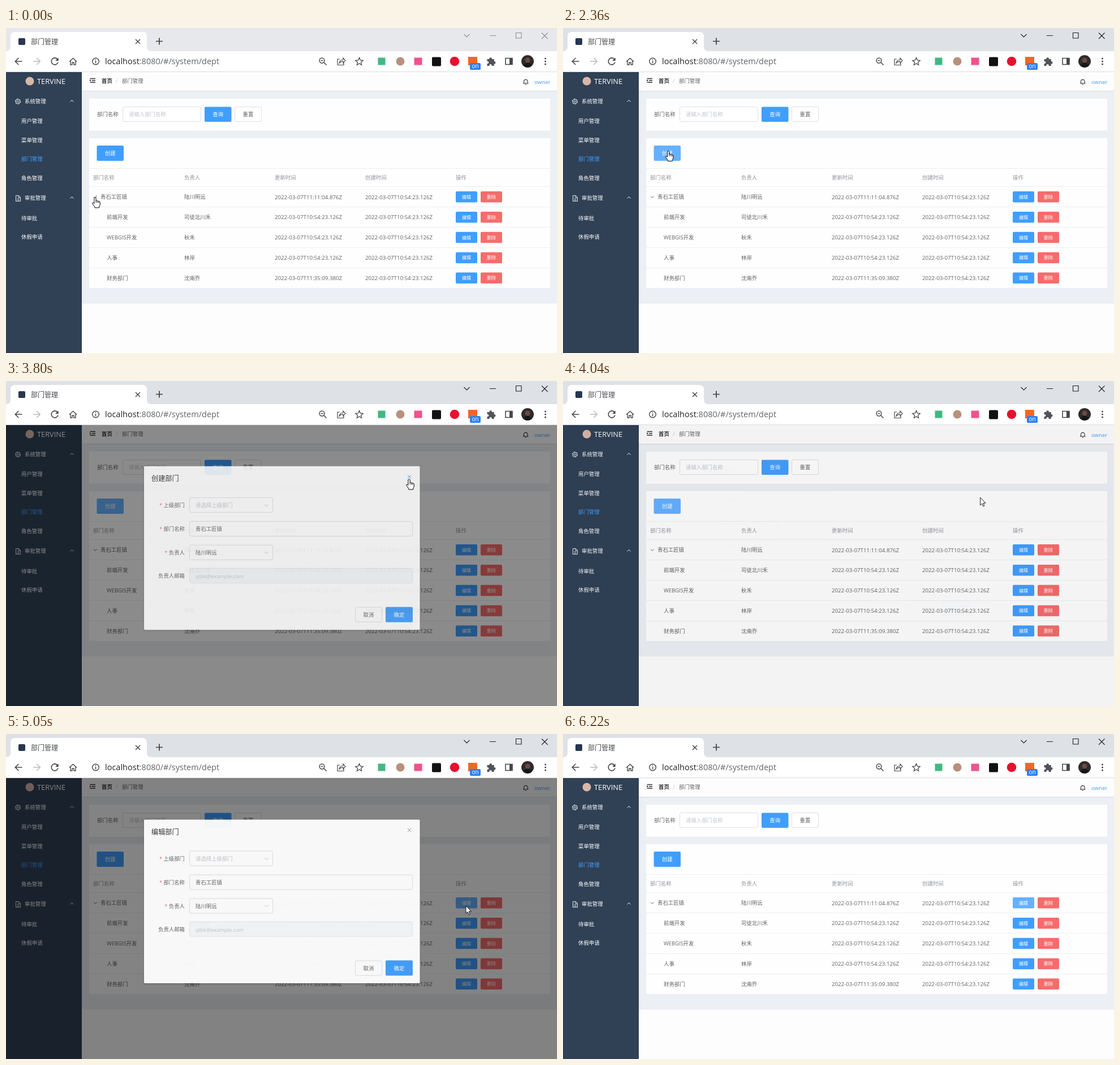
These frames come from a looping animation (974x575 px, 6.85 s). An HTML page:

```html
<!DOCTYPE html>
<html lang="zh-CN">
<head>
<meta charset="utf-8">
<style>
html, body { margin: 0; width: 100%; height: 100%; overflow: hidden; background: #fdfdfd; }
svg { display: block; font-family: "Open Sans", "Noto Sans CJK SC", "Noto Sans CJK", sans-serif; }
</style>
</head>
<body>
<svg id="stage" width="974" height="575" viewBox="0 0 974 575"></svg>
<script>
const BLUE = '#409eff', FOCUS = '#66b1ff', RED = '#f56c6c', GREY = '#606266', PALE = '#c0c4cc';

// Drawing helpers; text is placed by its vertical centre.
const rect = (x, y, w, h, fill, more = '') =>
  `<rect x="${x}" y="${y}" width="${w}" height="${h}" fill="${fill}" ${more}/>`;
const text = (x, cy, s, size = 9.4, fill = GREY, more = '') =>
  `<text x="${x}" y="${cy + size * .37}" font-size="${size}" fill="${fill}" ${more}>${s}</text>`;
const line = (d, color, width = 1, more = '') =>
  `<path d="${d}" fill="none" stroke="${color}" stroke-width="${width}" ${more}/>`;
const shape = (d, fill, more = '') => `<path d="${d}" fill="${fill}" ${more}/>`;
const dot = (x, y, r, fill, more = '') => `<circle cx="${x}" cy="${y}" r="${r}" fill="${fill}" ${more}/>`;
const group = (id, body, more = '') => `<g id="${id}" ${more}>${body}</g>`;
const frame = (x, y, w, h, fill = '#fff', border = '#dcdfe6') =>
  rect(x + .5, y + .5, w - 1, h - 1, fill, `rx="2.5" stroke="${border}"`);
const button = (x, y, w, h, label, fill, id = '', size = 9.4) =>
  rect(x, y, w, h, fill, `rx="2" ${id && `id="${id}"`}`) +
  text(x + w / 2, y + h / 2, label, size, '#fff', 'text-anchor="middle" font-weight="500"');
const plain = (x, y, label) => frame(x, y, 48, 27) +
  text(x + 24, y + 13.5, label, 9.4, GREY, 'text-anchor="middle" font-weight="500"');
const gear = (x, y, r, color) => dot(x, y, r, 'none', `stroke="${color}"`) +
  dot(x, y, r * .4, 'none', `stroke="${color}" stroke-width=".9"`) +
  dot(x, y, r * 1.17, 'none', `stroke="${color}" stroke-width="1" stroke-dasharray="${r * .5} ${r * .725}"`);

function browser() {
  const ink = '#44474b';
  return rect(0, 0, 974, 41, '#dee1e6', 'id="strip"') +
    shape('M0 41Q8 41 8 33V15Q8 7 16 7H241Q249 7 249 15V33Q249 41 257 41Z', '#fff') +
    rect(22, 18, 12, 12, '#26374f', 'rx="2"') +
    text(44, 24.5, '部门管理', 12, '#45484d') +
    line('M229 20l8 8m0-8l-8 8', '#3c4043', 1.4) +
    line('M265 23.5h12m-6-6v12', '#3c4043', 1.7) +
    group('controls', line('M809.5 11l5 5 5-5M855 13.5h11M901.5 8.5h9.5v9.5h-9.5zM947 8.5l10.5 10.5m0-10.5l-10.5 10.5', 'currentColor', 1.1)) +
    rect(0, 41, 974, 37, '#fff') + rect(0, 77, 974, 1, '#dadce0') +
    line('M28.5 59H16.500m5.800-6l-6 6 6 6', ink, 1.6) +
    line('M48 59h12m-5.800-6l6 6-6 6', '#b9bbbe', 1.6) +
    line('M91.200 55.500A6 6 0 1 0 92 60.500', ink, 1.6) + shape('M92.700 52.500v5.500h-5.500z', ink) +
    line('M112 59.500l6.500-6 6.500 6M114 58v7h3v-4h3v4h3v-7', ink, 1.4) +
    dot(158.5, 59, 5.8, 'none', `stroke="${ink}" stroke-width="1.4"`) + line('M158.500 58v4.200m0-7v1.500', ink, 1.5) +
    text(175, 59, '<tspan fill="#202124">localhost</tspan>:8080/#/system/dept', 14.5, '#5f6368') +
    dot(558.5, 57.5, 4.4, 'none', `stroke="${ink}" stroke-width="1.5"`) + line('M562 61l4.500 4.500M556.500 57.500h4', ink, 1.5) +
    line('M590 55h-4v10.500h11v-3.500M589 62q1-6 7-6v-3l4 4.500-4 4.500v-3q-4-.3-7 3z', ink, 1.2) +
    line('M624.500 52.500l1.900 4.500 4.800.4-3.700 3.200 1.100 4.700-4.100-2.500-4.100 2.500 1.100-4.700-3.700-3.200 4.800-.4z', ink, 1.3) +
    rect(657.5, 52.5, 13, 13, '#41b883') + dot(697, 59, 7.5, '#b8917c') +
    rect(721.5, 52.5, 14, 13, '#f0528c') + rect(753, 51.5, 16, 16, '#111', 'rx="2"') +
    dot(793, 59, 8.3, '#e8102d') + rect(817, 51, 16, 15, '#f26722') +
    rect(820, 62, 19, 12, '#2f80ed', 'rx="2"') + text(829.5, 67.3, 'on', 10, '#fff', 'text-anchor="middle"') +
    shape('M850.500 55h4a2.200 2.200 0 1 1 4.300 0h4v4.200a2.200 2.200 0 1 1 0 4.300v3.500h-4.200a2.200 2.200 0 1 0-4 0h-4.100v-4a2.200 2.200 0 1 0 0-4.200z', '#50545a') +
    line('M883 53.500h12v11h-12z', ink, 1.6) + rect(890, 53, 5, 12, ink) +
    dot(922, 59, 11, '#302a2b') + dot(922, 57, 4.5, '#6b4945') + shape('M914.500 66q7.500-9 15 0-7.500 7-15 0z', '#151719') +
    [54, 59, 64].map(y => dot(953.5, y, 1.5, ink)).join('');
}

function sidebar() {
  const item = (y, s, color = '#fff') => text(27, y, s, 9.4, color, 'font-weight="500"');
  const head = (y, s) => text(33, y, s, 9.4, '#fff', 'font-weight="500"') +
    line(`M113.500 ${y + .5}l3-3 3 3`, '#fff');
  return rect(0, 78, 134, 497, '#304156') + dot(42, 94, 7.5, '#d8b7a8') +
    text(55, 94, 'TERVINE', 12.8, '#fff') +
    gear(21, 130, 4, '#e4e8ed') + head(130, '系统管理') +
    item(165, '用户管理') + item(198.5, '菜单管理') + item(232, '部门管理', BLUE) + item(265.5, '角色管理') +
    line('M17.500 296.500h5l3 3v7h-8zM22 296.500v3.500h3.500M19.500 302h4m-4 2.500h4', '#e4e8ed') + head(301, '审批管理') +
    item(337, '待审批') + item(370, '休假申请');
}

const stamp = '2022-03-07T10:54:23.126Z';
const rows = [
  ['青石工匠镇', '陆川明远', '2022-03-07T11:11:04.876Z'],
  ['前端开发', '司徒北川禾', stamp],
  ['WEBGIS开发', '秋禾', stamp],
  ['人事', '林岸', stamp],
  ['财务部门', '沈南乔', '2022-03-07T11:35:09.380Z']
];

function tableRow([name, owner, updated], i) {
  const y = 299 + i * 35.9;
  return rect(147, Math.round(y + 17), 815, 1, '#ebeef5') +
    text(i ? 178 : 167, y, name) + text(315, y, owner) +
    text(475, y, updated, 9.7) + text(635, y, stamp, 9.7) +
    button(795, y - 10, 38, 19.5, '编辑', BLUE, 'edit' + i, 8) +
    button(839, y - 10, 38, 19.5, '删除', RED, '', 8);
}

function page() {
  return rect(134, 78, 840, 497, '#fdfdfd') + rect(134, 111, 840, 1, '#d8dce5') +
    rect(134, 112, 840, 375.5, '#eceff3') +
    line('M148.500 89.500h9.500m-6 3.200h6m-9.500 3.300h9.500', '#303133', 1.4) + shape('M148 91l3 1.700-3 1.700z', '#303133') +
    text(169, 94, '首页', 9.4, '#303133', 'font-weight="700"') + text(194, 94, '/', 9.4, PALE) + text(205, 94, '部门管理') +
    line('M914 98h9.500M915.500 98v-3.500q0-3 3.200-3.200 3.300.2 3.300 3.200v3.500M918.700 90.500v1M917.500 99.700h2.500', '#303133', 1.1) +
    text(934, 95.5, 'owner', 9.6, BLUE) +
    rect(147, 125, 815, 56.5, '#fefefe') +
    text(161, 153, '部门名称') + frame(206, 139, 139, 27) + text(217, 153, '请输入部门名称', 9.4, PALE) +
    button(351, 139.5, 47.5, 26.5, '查询', BLUE) + plain(404, 139, '重置') +
    rect(147, 195, 815, 265.5, '#fefefe', 'id="card"') +
    button(160.5, 208, 47.5, 27, '创建', BLUE, 'create') +
    rect(147, 248, 815, 1, '#ebeef5') + rect(147, 280, 815, 1, '#ebeef5') +
    ['部门名称', '负责人', '更新时间', '创建时间', '操作']
      .map((s, i) => text(i ? 155 + i * 160 : 154, 265, s, 9.4, '#909399')).join('') +
    rect(147, 281, 815, 35.5, '#f4f8fb', 'id="hover"') +
    tableRow(rows[0], 0) + group('children', rows.slice(1).map((r, i) => tableRow(r, i + 1)).join('')) +
    group('twisty', line('M-2.800-1.400L0 1.400 2.800-1.400', GREY, 1));
}

function popup() {
  const tints = ['#ffc5d5', '#ffd966', '#fff56b', '#caf758', '#aefce6'];
  return rect(115.5, 248.5, 100, 36.5, '#fff', 'rx="2" stroke="#b9b9b9" filter="url(#soft)"') +
    rect(116, 272, 99, 12.5, '#f0f0f0') + shape('M166 285h10l-5 4z', '#f0f0f0') +
    tints.map((c, i) => dot(127.5 + i * 18.9, 259.5, 6.3, c, 'stroke="#0002" stroke-width=".6"')).join('') +
    text(123, 278.5, 'My Notebook...', 7.6, '#555', 'font-family="Liberation Sans, sans-serif"') +
    shape('M183.500 277h5l-2.500 3.500z', '#555') + rect(195, 272, 1, 12.500, '#d0d0d0') + gear(205.5, 278.5, 3, '#555') +
    rect(165, 308, 13, 13, '#f4f4f4') + line('M167 315.500q2-3 4-1l4.500-4.500M166 319.500h11', '#222', 1.8);
}

function dialog() {
  const label = (y, s, star) => text(316, y, (star ? '<tspan fill="#f56c6c">* </tspan>' : '') + s, 9.4, GREY, 'text-anchor="end"');
  const arrow = y => line(`M457 ${y - 1.5}l3.300 3.300 3.300-3.300`, PALE);
  return rect(244, 152, 487.5, 289.5, '#fff', 'rx="2" filter="url(#soft)"') +
    text(257, 173.5, '', 12.2, '#303133', 'id="title"') +
    line('M710 167.500l6 6m0-6l-6 6', 'currentColor', 1, 'id="close"') +
    label(221, '上级部门', 1) + frame(324, 207, 148, 27) + text(335, 221, '请选择上级部门', 9.4, PALE) + arrow(221) +
    label(262.5, '部门名称', 1) + frame(324, 249, 395, 27) + text(335, 262.5, rows[0][0]) +
    label(304.5, '负责人', 1) + frame(324, 291, 148, 27) + text(335, 304.5, rows[0][1]) + arrow(304.5) +
    label(346, '负责人邮箱') + frame(324, 332, 395, 27, '#f5f7fa', '#e4e7ed') + text(335, 346.5, 'qtbk@example.com', 9.2, PALE) +
    plain(617, 401, '取消') + button(671, 401, 48, 27, '确定', BLUE);
}

const stage = document.getElementById('stage');
stage.innerHTML =
  '<defs><filter id="soft" x="-10%" y="-20%" width="120%" height="140%"><feDropShadow dx="0" dy="1" stdDeviation="1.3" flood-opacity=".3"/></filter></defs>' +
  page() + sidebar() +
  group('selection', rect(167, 291, 10, 16, '#1e80ff') + text(167, 299, rows[0][0][0], 9.4, '#fff')) +
  group('popup', popup()) +
  rect(0, 78, 974, 497, '#000', 'id="shade"') + group('dialog', dialog()) + browser() +
  group('arrow', shape('M0 0V13.500L3.100 10.700 5.200 15.600 7.300 14.700 5.200 9.900H9.400Z', '#fff', 'stroke="#000" stroke-width=".9"')) +
  group('hand', shape('M-1.600 1.200Q0-.8 1.600 1.200V6Q3 5.200 4 6.600 5.400 6 6.400 7.400 8.600 7 8.800 9V12.500Q8.600 15 7.200 16.500V18.500H-.6V16.800L-4.600 11.600Q-5.200 9.400-3.200 9.600L-1.600 11Z', '#fff', 'stroke="#000"') +
    line('M1.600 6v3.500M4 6.800v3M6.400 7.600v2.700', '#000', .9));

const el = {};
for (const node of stage.querySelectorAll('[id]')) el[node.id] = node;
const set = (id, name, value) => el[id].setAttribute(name, value);
const show = (id, on) => set(id, 'visibility', on ? 'visible' : 'hidden');

const LOOP = 6850;
const ticks = [[0, 1], [630, 1], [770, 1], [1040, 6], [1760, 6], [2600, 6], [3320, 6], [4040, 4],
  [4550, 1], [4690, 4], [5200, 3], [5590, 2], [5860, 4]]
  .flatMap(([start, n]) => Array.from({ length: n }, (_, i) => start + i * 120));

const path = [[0, 157.5, 299.5], [1040, 159, 301], [1160, 180, 306], [1280, 275, 348], [1400, 393, 379],
  [1640, 723, 383], [1760, 723, 383], [2000, 500, 290], [2240, 225, 210], [2360, 186, 217], [2600, 192, 221],
  [2720, 342, 235], [3200, 560, 230], [3680, 712.5, 173.5], [3920, 712.5, 173.5], [4400, 813, 304],
  [5050, 813, 304], [5440, 682, 189], [5710, 712, 173], [5860, 717, 181]];
const fade = [[0, 0], [2480, 0], [2600, .12], [2720, .72], [2840, 1], [3680, 1], [3800, .91], [3920, .45], [4040, .08],
  [4160, 0], [4690, 0], [4810, .07], [4930, .62], [5050, .97], [5200, 1], [5860, 1], [5980, .94], [6100, .4], [6220, 0]];

function sample(track, t) {
  const i = track.findIndex(k => k[0] > t);
  if (i < 0) return track[track.length - 1].slice(1);
  const a = track[i - 1], b = track[i], f = (t - a[0]) / (b[0] - a[0]);
  return a.slice(1).map((v, j) => v + (b[j + 1] - v) * f);
}

function draw(now) {
  const t = ticks.findLast(k => k <= now % LOOP);
  const within = (...spans) => spans.some(([a, b]) => t >= a && t < b);
  const [x, y] = sample(path, t), [open] = sample(fade, t);
  const active = t >= 630, collapsed = within([630, 1040]), present = t < 6220;

  set('strip', 'fill', active ? '#dee1e6' : '#e7e8ec');
  set('controls', 'color', active ? '#222' : '#8d8f93');
  set('card', 'height', collapsed ? 122 : 265.5);
  show('children', !collapsed);
  set('twisty', 'transform', `translate(158 299) rotate(${t < 630 ? -30 : t < 770 ? -60 : collapsed ? -90 : 0})`);
  show('selection', within([1040, 1760]));
  show('popup', within([1160, 1760]));

  const row = Math.floor((y - 281) / 35.9);
  show('hover', active && present && open < .5 && row >= 0 && row < (collapsed ? 1 : 5));
  set('hover', 'y', 281 + Math.max(0, row) * 35.9);
  set('create', 'fill', within([2360, 4160]) ? FOCUS : BLUE);
  set('edit0', 'fill', t >= 4550 ? FOCUS : BLUE);

  set('shade', 'opacity', open / 2);
  show('dialog', open > 0);
  set('dialog', 'opacity', open ** 1.7);
  set('dialog', 'transform', `translate(0 ${-13 * (1 - open)})`);
  el.title.textContent = t < 4550 ? '创建部门' : '编辑部门';
  set('close', 'color', within([3680, 4040], [5710, 6220]) ? BLUE : '#909399');

  const pointing = within([0, 1040], [2360, 2720], [3680, 3920], [4400, 4690], [5710, 5860]);
  show('hand', present && pointing);
  show('arrow', present && !pointing);
  for (const id of ['hand', 'arrow']) set(id, 'transform', `translate(${x} ${y})`);
}

(function loop() {
  draw(performance.now());
  requestAnimationFrame(loop);
})();
</script>
</body>
</html>
```
